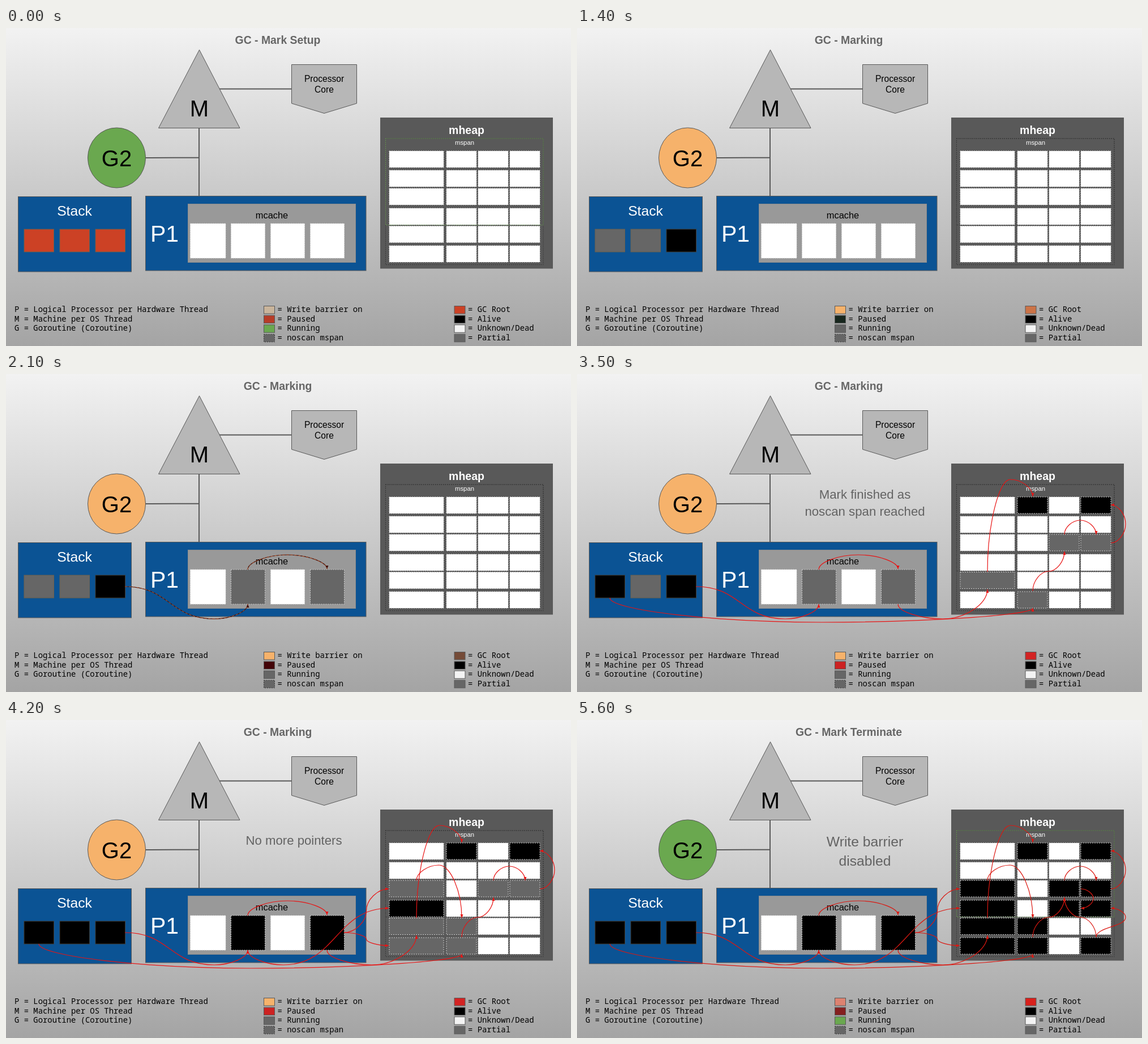
Animation, 998 px wide and 561 px high, one loop 6.3 s. Source, as an HTML page:

```html
<!DOCTYPE html>
<html lang="en">
<head>
<meta charset="utf-8">
<title>Garbage collector marking</title>
<style>
  html, body { margin: 0; width: 100%; height: 100%; overflow: hidden; }
  svg { display: block; width: 100%; height: 100%; }
  text { font-family: "Liberation Sans", Arial, sans-serif; white-space: pre; }
  .mono { font-family: "Noto Sans Mono", "DejaVu Sans Mono", monospace; font-size: 13.9px; font-weight: 500; }
</style>
</head>
<body>
<svg id="stage" viewBox="0 0 998 561"></svg>
<script>
const STEP = 700;
const EDGE = '#595959', GREEN = '#6aa84f', ORANGE = '#f6b26b', RED = '#cc4125', GREY = '#666';
const FILL = { w: '#fff', g: GREY, b: '#000', r: RED };

// Curved connectors leaving and arriving vertically (turning at height m) or horizontally (turning at x = m).
const vertical = (x1, y1, x2, y2, m = (y1 + y2) / 2) => {
  const mid = (x1 + x2) / 2;
  return `M${x1} ${y1}C${x1} ${(y1 + m) / 2} ${(x1 + mid) / 2} ${m} ${mid} ${m}S${x2} ${(y2 + m) / 2} ${x2} ${y2}`;
};
const horizontal = (x1, y1, x2, y2, m = (x1 + x2) / 2) => {
  const mid = (y1 + y2) / 2;
  return `M${x1} ${y1}C${(x1 + m) / 2} ${y1} ${m} ${(y1 + mid) / 2} ${m} ${mid}S${(x2 + m) / 2} ${y2} ${x2} ${y2}`;
};

// Pointer curves in the order in which they are discovered.
const POINTERS = [
  'M210 375C289 375 289 432 368 432C398 432 427 419 427 406',
  vertical(427, 345, 567, 344, 319),
  vertical(567, 406, 725, 380, 432),
  vertical(725, 349, 805, 216, 186),
  vertical(58, 395, 805, 413, 438),
  vertical(805, 383, 861, 313),
  vertical(861, 283, 917, 283, 258),
  horizontal(943, 298, 943, 231, 969),
  'M427 406C427 419 458 432 490 432C583 432 583 332 676 332',
  horizontal(597, 375, 676, 298),
  horizontal(597, 375, 676, 398),
  vertical(725, 283, 805, 349, 256),
  horizontal(890, 298, 890, 332, 912),
  vertical(917, 383, 861, 313),
  'M917 383C917 365 969 365 969 348C969 340 956 332 943 332'
];

// legend: write barrier, paused, running, root
const setup = {
  title: 'GC - Mark Setup', g: GREEN, stack: 'rrr', cache: 'wwww',
  heap: 'wwww wwww wwww wwww wwww wwww', arrows: 0, note: [],
  legend: ['#c9b49b', '#b73c27', GREEN, RED], spanEdge: GREEN
};
const marking = {
  ...setup, title: 'GC - Marking', g: ORANGE, stack: 'ggb',
  legend: [ORANGE, '#17261d', GREY, '#cc7347'], spanEdge: '#303030'
};
const firstChain = {
  ...marking, cache: 'wgwg', arrows: 2, ink: '#43100a', dash: '#b5562e',
  legend: [ORANGE, '#430408', GREY, '#754b37']
};
const noscan = {
  ...firstChain, heap: 'wbww wwww wwww wwww gwww wwww', arrows: 4,
  note: ['Mark finished as', 'noscan span reached']
};
const secondChain = {
  ...noscan, stack: 'bgb', heap: 'wbwb wwww wwgg wwww gwww wgww', arrows: 8,
  ink: '#e81414', dash: '', legend: [ORANGE, '#c22', GREY, '#d32323']
};
const exhausted = {
  ...secondChain, stack: 'bbb', cache: 'wbwb', arrows: 12,
  heap: 'wbwb wwww gwgg bwww ggww ggww', note: ['No more pointers']
};
const scanned = {
  ...exhausted, heap: 'wbwb wwww bwbb bwbb bbww bbwb', arrows: 15,
  note: ['All Grey objects are', 'scanned and all white', 'object can be collected'],
  legend: [ORANGE, '#c80b10', GREY, '#d33a30']
};
const terminate = {
  ...scanned, title: 'GC - Mark Terminate', g: GREEN, ink: '#db1811',
  note: ['Write barrier', 'disabled'], noteSize: 24.7, noteY: 223, noteLead: 34,
  legend: ['#dd8270', '#851f1f', GREEN, '#d9201c'], spanEdge: GREEN
};
const STATES = [
  setup,
  { ...setup, g: RED },
  marking, firstChain, noscan, secondChain, exhausted, scanned, terminate
];

const rect = (x, y, w, h, fill, stroke = EDGE, extra = '') =>
  `<rect x="${x}" y="${y}" width="${w}" height="${h}" fill="${fill}" stroke="${stroke}" ${extra}/>`;
const label = (text, x, y, size, fill = '#000', weight = 400) =>
  `<text x="${x}" y="${y}" font-size="${size}" fill="${fill}" font-weight="${weight}" text-anchor="middle">${text}</text>`;
const mono = (text, x, y) => `<text class="mono" x="${x}" y="${y}">${text}</text>`;
const line = d => `<path d="${d}" fill="none" stroke="${EDGE}" stroke-width="2"/>`;
const poly = points => `<polygon points="${points}" fill="#b7b7b7" stroke="${EDGE}"/>`;
const cell = (kind, x, y, w, h) =>
  rect(x, y, w, h, FILL[kind], kind === 'w' ? '#ddd' : '#ccc', 'stroke-dasharray="2 2"');

const machine = () =>
  line('M377 107.5H505M341 176V296M247 229L341 228.5') +
  poly('341.5,38.5 413,176.5 269.5,176.5') + label('M', 341.5, 156, 40) +
  poly('504.5,64.5 619.5,64.5 619.5,133 562,150.5 504.5,133') +
  label('Processor', 562, 95, 15.6) + label('Core', 562, 113.5, 15.6);

const stack = s =>
  rect(21.5, 297.5, 200, 132.5, '#0b5394') + label('Stack', 121, 331, 24.7, '#fff') +
  [...s.stack].map((k, i) => rect(32 + i * 63, 355, 52.5, 40, FILL[k], k === 'b' ? '#403a30' : '#6b604f')).join('');

const processor = s =>
  rect(246.5, 296.5, 389.5, 131.5, '#0b5394') + label('P1', 280, 376.5, 41, '#fff') +
  rect(321.5, 310.5, 296, 103, '#999', '#8c8c8c') + label('mcache', 469.5, 335.5, 16.4) +
  [...s.cache].map((k, i) => cell(k, i ? 327.5 + i * 70 : 325.5, 345, i ? 60 : 62.5, 61)).join('');

function heap(s) {
  const columns = [[677, 96], [778, 53], [834, 53], [890, 53]];
  const rows = [217, 251, 283, 318, 349.5, 384];
  const dots = 'stroke-dasharray="1.5 2"';
  return rect(661.5, 158.5, 304, 265.5, EDGE) +
    label('mheap', 813.5, 187, 19.5, '#fff', 700) + label('mspan', 810, 206, 11.4, '#fff') +
    rect(670.5, 195, 278.5, 222.5, 'none', '#303030', dots) +
    rect(670.5, 195, 278.5, 152.5, 'none', s.spanEdge, dots) +
    s.heap.split(' ').map((row, r) =>
      [...row].map((k, c) => cell(k, columns[c][0], rows[r], columns[c][1], 29)).join('')).join('');
}

function pointers(s) {
  return POINTERS.slice(0, s.arrows).map(d =>
    `<path d="${d}" fill="none" stroke="${s.ink}" stroke-width="1.2" marker-end="url(#tip)"/>` +
    (s.dash ? `<path d="${d}" fill="none" stroke="${s.dash}" stroke-dasharray="4 3"/>` : '')).join('');
}

function legend([barrier, paused, running, root]) {
  const entries = (x, items) => items.map(([name, fill, dash], i) =>
    rect(x + .5, 490.5 + i * 16.6, 19, 13.5, fill, dash ? '#333' : EDGE, dash ? 'stroke-dasharray="2 2"' : '') +
    mono('= ' + name, x + 24.5, 501 + i * 16.6)).join('');
  return ['P = Logical Processor per Hardware Thread', 'M = Machine per OS Thread', 'G = Goroutine (Coroutine)']
    .map((text, i) => mono(text, 15, 501 + i * 16.6)).join('') +
    entries(455, [['Write barrier on', barrier], ['Paused', paused], ['Running', running], ['noscan mspan', GREY, true]]) +
    entries(791.5, [['GC Root', root], ['Alive', '#000'], ['Unknown/Dead', '#f3f3f3'], ['Partial', GREY]]);
}

function draw(s) {
  const { noteSize = 22.2, noteY = 220, noteLead = 30 } = s;
  return `<defs>
    <linearGradient id="sky" x2="0" y2="1"><stop stop-color="#f2f2f2"/><stop offset="1" stop-color="#a4a4a4"/></linearGradient>
    <marker id="tip" markerUnits="userSpaceOnUse" markerWidth="7" markerHeight="6" refX="6" refY="3" orient="auto">
      <path d="M0 .5L6 3L0 5.5z" fill="${s.ink}"/></marker></defs>` +
    rect(0, 0, 998, 561, 'url(#sky)', 'none') +
    label(s.title, 480, 28, 19.4, GREY, 700) +
    machine() +
    `<ellipse cx="195.5" cy="229" rx="51" ry="53" fill="${s.g}" stroke="${EDGE}"/>` +
    label('G2', 195.5, 244, 40) +
    stack(s) + processor(s) + heap(s) + pointers(s) +
    s.note.map((text, i) => label(text, 508.5, noteY + i * noteLead, noteSize, '#636363')).join('') +
    legend(s.legend);
}

const stage = document.getElementById('stage');
let shown = -1;
function tick() {
  const index = Math.floor(performance.now() / STEP) % STATES.length;
  if (index !== shown) {
    stage.innerHTML = draw(STATES[index]);
    shown = index;
  }
  requestAnimationFrame(tick);
}
tick();
</script>
</body>
</html>
```
